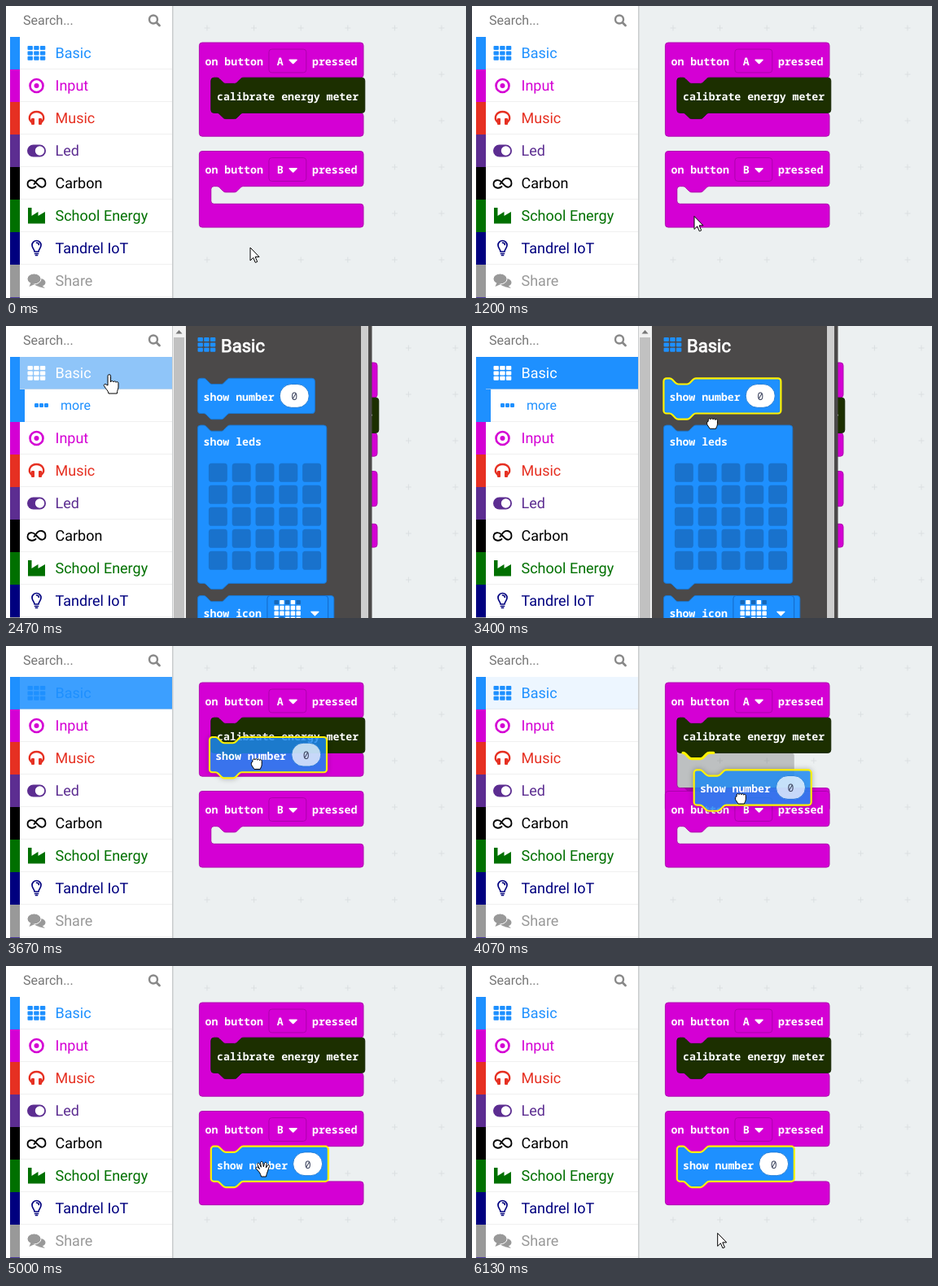
Recreate the animation shown at these times as an HTML page. Size 565 by 359 pixels, loop 7340 ms.

```html
<!DOCTYPE html>
<html lang="en">
<head>
<meta charset="utf-8">
<title>Block editor</title>
<style>
html, body { margin: 0; width: 100%; height: 100%; overflow: hidden; background: #fff; }
svg { display: block; width: 565px; height: 359px; text-rendering: geometricPrecision; }
.menu { font: 18px Roboto, sans-serif; }
.small { font: 16px Roboto, sans-serif; }
.head { font: 22px Roboto, sans-serif; fill: #fff; stroke: #fff; stroke-width: .8; }
.mono { font: bold 14.67px "Noto Sans Mono", "DejaVu Sans Mono", monospace; fill: #fff; }
.num { font-weight: 400; fill: #3f4660; text-anchor: middle; }
.tip { font: 12px "Liberation Sans", Arial, sans-serif; fill: #000; }
</style>
</head>
<body>
<svg id="stage" viewBox="0 0 565 359"></svg>
<script>
const LOOP = 7340, STEP = LOOP / 110;
const BLUE = '#1e90ff', PINK = '#d400d4', YELLOW = '#fff200';
const OPEN = 2330, GRAB = 3260, DRAG = 3600, DROP = 4995;

// ---- helpers ----
const rect = (x, y, w, h, fill, r = 0, more = '') =>
  `<rect x="${x}" y="${y}" width="${w}" height="${h}" rx="${r}" fill="${fill}" ${more}/>`;
const path = (d, fill, more = '') => `<path d="${d}" fill="${fill}" ${more}/>`;
const line = (d, width, color = 'currentColor') =>
  path(d, 'none', `stroke="${color}" stroke-width="${width}" stroke-linecap="round" stroke-linejoin="round"`);
const text = (x, y, s, cls, more = '') => `<text x="${x}" y="${y}" class="${cls}" ${more}>${s}</text>`;
const at = (x, y, body, scale = 1) => `<g transform="translate(${x} ${y}) scale(${scale})">${body}</g>`;
const block = (x, y, body) => at(x, y, body, .9);
const times = (n, fn) => Array.from({ length: n }, (_, i) => fn(i)).join('');
const clamp = v => Math.max(0, Math.min(1, v));

// Position on a list of [time, x, y] points
function track(points, t) {
  const i = points.findIndex(p => p[0] > t);
  if (i < 0) return points[points.length - 1].slice(1);
  if (i === 0) return points[0].slice(1);
  const [a, b] = [points[i - 1], points[i]];
  const k = (t - a[0]) / (b[0] - a[0]);
  return [a[1] + (b[1] - a[1]) * k, a[2] + (b[2] - a[2]) * k];
}

// ---- blocks, in units of 0.9 px ----
const NOTCH = 'c2 0 3 1 4 2l4 4c1 1 2 2 4 2h12c2 0 3-1 4-2l4-4c1-1 2-2 4-2';
const TAB = 'c-2 0-3 1-4 2l-4 4c-1 1-2 2-4 2h-12c-2 0-3-1-4-2l-4-4c-1-1-2-2-4-2';
const turn = (x, y, sweep = 1) => `a4 4 0 0 ${sweep} ${x} ${y}`;

const statement = (w, h = 48) =>
  `M0 4${turn(4, -4)}H8${NOTCH}H${w - 4}${turn(4, 4)}V${h - 4}${turn(-4, 4)}H44${TAB}H4${turn(-4, -4)}z`;
const eventShape = h =>
  `M0 4${turn(4, -4)}H220${turn(4, 4)}V44${turn(-4, 4)}H60${TAB}H20${turn(-4, 4, 0)}v${h - 8}${turn(4, 4, 0)}` +
  `H220${turn(4, 4)}v24${turn(-4, 4)}H4${turn(-4, -4)}z`;
const arrowDown = (x, y) => path(`M${x} ${y}h10l-5 5z`, '#fff', 'stroke="#fff" stroke-width="1.5" stroke-linejoin="round"');

const eventBlock = (letter, h) =>
  path(eventShape(h), PINK, 'stroke="#aa00aa"') + text(8, 31, 'on button', 'mono') +
  rect(95, 9, 51, 32, PINK, 4, 'stroke="#aa00aa"') + text(106, 31, letter, 'mono') +
  arrowDown(123, 23.5) + text(154, 31, 'pressed', 'mono');

const calibrate = path(statement(210), '#1c2f00', 'stroke="#142300"') + text(8, 31, 'calibrate energy meter', 'mono');

function showNumber(selected, dragged) {
  const edge = selected ? `stroke="${YELLOW}" stroke-width="2.4"` : 'stroke="#1976d2"';
  return path(statement(160), BLUE, `${edge} fill-opacity="${dragged ? .8 : 1}"`) +
    text(8, 31, 'show number', 'mono') +
    rect(112, 8, 40, 32, '#fff', 16, `stroke="#1976d2" opacity="${dragged ? .72 : 1}"`) +
    text(132, 30, '0', 'mono num');
}

const marker = path(statement(160), '#000', 'opacity=".2"');
const joint = y => line(`M8 ${y}${NOTCH}h6`, 3.5, YELLOW);

const showLeds = path(statement(176, 216), BLUE, 'stroke="#1976d2"') + text(8, 28, 'show leds', 'mono') +
  times(25, i => rect(15 + i % 5 * 32, 52 + Math.floor(i / 5) * 30, 25.5, 25.5, '#1972cc', 4));

const showIcon = path(statement(186), BLUE, 'stroke="#1976d2"') + text(8, 29, 'show icon', 'mono') +
  rect(95, 0, 83, 44, BLUE, 4, 'stroke="#1565c0"') +
  times(25, i => rect(104.5 + i % 5 * 7.5, 6 + Math.floor(i / 5) * 7.6, 6, 6,
    '.#.#.###########.###...#..'[i] === '#' ? '#fff' : '#1767b8', 1)) +
  arrowDown(155, 22);

// ---- menu ----
const gridIcon = times(9, i => rect(-11 + i % 3 * 7.7, -9 + Math.floor(i / 3) * 6.4, 6.4, 5, 'currentColor', 1));
const dots = times(3, i => rect(-8.5 + i * 6, -3, 5, 5, 'currentColor', 1.2));
const ROWS = [
  ['Basic', BLUE, gridIcon],
  ['Input', PINK, '<circle r="8" fill="none" stroke="currentColor" stroke-width="2.6"/><circle r="3" fill="currentColor"/>'],
  ['Music', '#e63022', line('M-6 5C-12-1-7-8 0-8S12-1 6 5', 2.4) +
    rect(-6.5, 0, 4, 8, 'currentColor', 1) + rect(2.5, 0, 4, 8, 'currentColor', 1)],
  ['Led', '#5c2d91', rect(-11.5, -7.5, 23, 15, 'currentColor', 7.5) + '<circle cx="4" r="5.7" fill="#fff"/>'],
  ['Carbon', '#000', line('M-1 4C-4 7-11 6-11 1C-11-5-4-5-1-1L3 3C6 6 11 5 11 0C11-7 3-8 0-3L-3 1', 1.8)],
  ['School Energy', '#007000', path('M-10.5-10H-6V0L2-5V0L10.500-5V9.500H-10.500z', 'currentColor')],
  ['Tandrel IoT', '#00007f', line('M-2.500 4C-2.500 1-5.500 0-5.500-4A5.500 5.500 0 0 1 5.500-4C5.500 0 2.500 1 2.500 4zM-2 6.500H2M-1 8.500H1M0-7Q2.500-7 2.800-4.500', 1.7)],
  ['Share', '#999', '<ellipse cx="4" cy="2" rx="7" ry="5" fill="currentColor"/>' + path('M6 5L10.500 9L2 7z', 'currentColor') +
    '<ellipse cx="-3" cy="-2.500" rx="8.500" ry="6.500" fill="currentColor" stroke="#fff"/>' + path('M-7 2L-9 7L-2 4z', 'currentColor')],
  ['', '#4b3a9b', '']
];

function menu(open, glow, hover) {
  const rows = ROWS.map(row => [...row]);
  if (open) rows.splice(1, 0, ['more', BLUE, dots]);
  const body = rows.map(([name, color, icon], i) => {
    const sub = name === 'more', left = sub ? 23 : 17, y = 38 + 40 * i;
    const ink = i === 0 && open ? '#fff' : color;
    return rect(left, y, 204 - left, 40, i === hover ? '#f2f3f3' : '#fff') +
      (i === 0 ? rect(17, y, 187, 40, BLUE, 0, `opacity="${glow}"`) : '') +
      rect(left, y + 39.5, 204 - left, 1, '#e2e2e2') + rect(5, y, left - 5, 40, color) +
      `<g color="${ink}" fill="${ink}">${at(sub ? 43.5 : 37.5, y + 20, icon)}` +
      text(sub ? 67 : 60.5, y + (sub ? 25 : 26), name, sub ? 'small' : 'menu') + '</g>';
  }).join('');
  return rect(0, 0, 205, 359, '#fff') + text(21, 23, 'Search...', 'small', 'fill="#767676"') +
    '<circle cx="181" cy="16.500" r="5" fill="none" stroke="#888" stroke-width="2.400"/>' +
    line('M185 20.500L188.500 24', 2.8, '#888') + body + rect(204, 0, 1.5, 359, '#c9cccd');
}

const flyout = rect(205, 0, 16, 359, '#f1f1f1') + rect(206, 14, 13, 345, '#c1c1c1') +
  path('M208.500 9.500h8l-4-4.500z', '#777') + rect(221, 0, 228.5, 359, '#4b4949') +
  rect(436, -5, 9, 370, '#cecece', 4) +
  `<g color="${BLUE}">${at(246.5, 23, gridIcon)}</g>` + text(264, 32, 'Basic', 'head') +
  block(235.4, 122, showLeds) + block(235.4, 331.5, showIcon);

// ---- pointer ----
const POINTER = [
  [1070, 300, 297], [1400, 232, 200], [1800, 140, 78], [2130, 127, 60], [2640, 127, 60],
  [2800, 190, 85], [2930, 250, 108], [3130, 293, 88], [3230, 293, 88], [3400, 295, 119],
  [3600, 304, 137], [4070, 330, 187], [4670, 315, 250], [5940, 315, 250], [6005, 308, 285], [6090, 300, 340]
];
const CARRIED = [[DRAG, 246, 105], [4070, 272.7, 152.3], [4670, 258.5, 227.5]];
const SHAPES = {
  arrow: 'M0 0V16l3.700-3.600 2.600 6 2.400-1-2.600-6H11z',
  point: 'M-2 13V1.500a1.800 1.800 0 0 1 3.600 0V9c0-2 3.200-2 3.400 0 .3-1.600 3-1.600 3.200.4.4-1.400 2.600-1 2.800.8V15c0 3-1.600 4-1.600 8H-1c0-3-3.500-5.500-5.600-9.500-.8-1.800 1.600-2.800 2.800-1.400z',
  hand: 'M-3.500 4L-7.500-.5c-1.400-1.800.6-3 2-1.800l2 2-2.600-5.400c-.8-2 1.600-2.800 2.400-1l2 4-.6-5.400c0-2 2.400-2 2.800 0l.8 5 1.200-4.400c.6-1.800 2.800-1.200 2.600.6l-.8 5 2-3c1-1.400 2.800-.4 2.200 1.200L6.500 2C5.500 5 5 6 4.500 9h-6c-.4-2-1.200-3.400-2-5z',
  fist: 'M-5-2c-2 0-1.800 3-1 4.500L-3 7h7.500c.3-2 1.800-3 1.800-6v-4c0-2-2.200-2.200-2.600-.8 0-2-2.600-2-2.800-.4-.2-2-2.800-2-2.800-.2-.6-1.800-3-1.200-3 .4z'
};

function pointerKind(t, x, y, open) {
  if (t >= GRAB && t < DROP) return 'fist';
  if (x < 205) return 'point';
  if (t >= DROP) return y < 270 ? 'hand' : 'arrow';
  return open && x > 235 && x < 380 && y > 60 && y < 108 ? 'hand' : 'arrow';
}

const tooltip = `<g style="filter:drop-shadow(3px 3px 6px rgba(0,0,0,.2))">${rect(319, 265, 290, 56, '#ffffc7', 0, 'stroke="#ddd"')}</g>` +
  ['Scroll a number on the screen. If the number fits', 'on the screen (i.e. is a single digit), do not', 'scroll.']
    .map((s, i) => text(324, 281 + i * 17, s, 'tip')).join('');

// ---- scene ----
function workspace(t, slot) {
  const placed = t >= DROP;
  const grid = times(42, i => {
    const x = 247 + (i % 7 - 1) * 57.6, y = 27 + Math.floor(i / 7) * 57;
    return `M${x - 3.5} ${y}h7M${x} ${y - 3.5}v7`;
  });
  return path(grid, 'none', 'stroke="#dbdfe1"') +
    block(237.4, 45, eventBlock('A', slot === 'A' ? 96 : 48)) +
    block(251.8, 88.2, calibrate) +
    (slot === 'A' ? block(251.8, 131.4, marker) + block(251.8, 88.2, joint(48)) : '') +
    block(237.4, 178.5, eventBlock('B', slot === 'B' || placed ? 48 : 24)) +
    (slot === 'B' ? block(251.8, 221.7, marker + joint(0)) : '') +
    (placed ? block(251.8, 221.7, showNumber(true)) : '');
}

function scene(t) {
  const open = t >= OPEN && t < DRAG, dragging = t >= DRAG && t < DROP;
  const glow = t < DRAG ? clamp((t - OPEN) / 300) : clamp((4110 - t) / (4110 - DRAG));
  const [x, y] = track(POINTER, t);
  const hover = x < 205 ? Math.floor((y - 38) / 40) : -1;
  const [bx, by] = track(CARRIED, t);
  const slot = !dragging ? '' : by > 177 ? 'B' : by > 118 ? 'A' : '';
  return rect(0, 0, 565, 359, '#ecf0f1') + at(open ? 17 : 0, 0, workspace(t, slot)) +
    menu(open, glow, hover) +
    (open ? flyout + block(235.4, 64.3, showNumber(t > 3050)) : '') +
    (dragging ? `<g style="filter:drop-shadow(0 0 3px rgba(0,0,0,.3))">${block(bx, by, showNumber(true, true))}</g>` : '') +
    (t >= 5725 && t < 5990 ? tooltip : '') +
    (t < 6125 ? at(x, y, path(SHAPES[pointerKind(t, x, y, open)], '#fff', 'stroke="#000" stroke-linejoin="round"')) : '');
}

const stage = document.getElementById('stage');
let shown = -1;
function tick(now) {
  const n = Math.floor((now % LOOP + 6) / STEP) % 110;
  if (n !== shown) stage.innerHTML = scene((shown = n) * STEP);
  requestAnimationFrame(tick);
}
tick(0);
</script>
</body>
</html>
```
